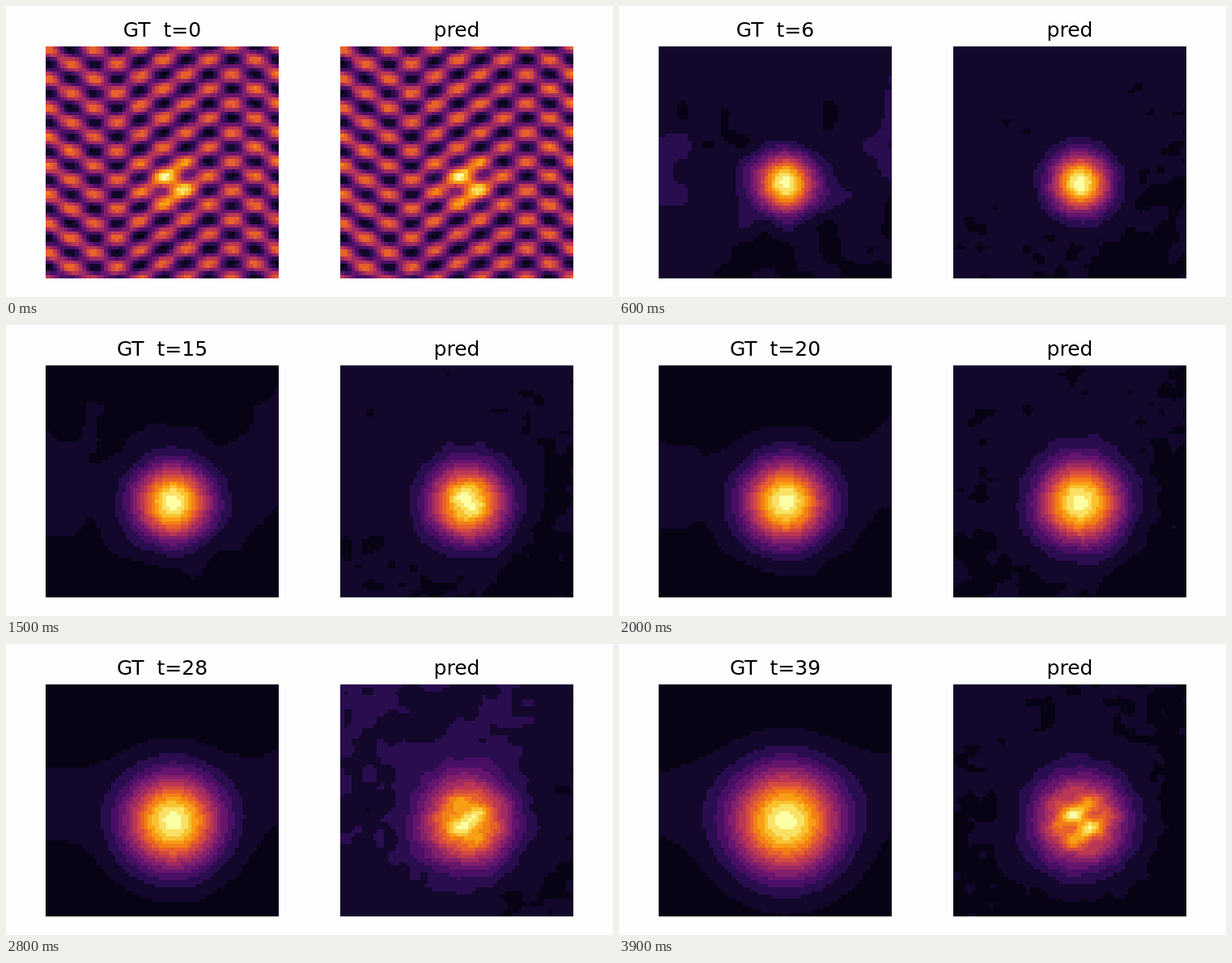
An HTML page with a canvas that plays this animation: 750x360 px, repeating every 4 s.

```html
<!DOCTYPE html>
<html lang="en">
<head>
<meta charset="utf-8">
<title>Diffusion rollout</title>
<style>
html, body { margin: 0; width: 750px; height: 360px; overflow: hidden; background: #fefefe; }
canvas, svg { position: absolute; left: 0; top: 0; }
text { font: 25px "DejaVu Sans", sans-serif; text-anchor: middle; fill: #000004; white-space: pre; }
</style>
</head>
<body>
<canvas id="stage" width="750" height="360"></canvas>
<svg width="750" height="360">
  <text id="label" x="193" y="38">GT  t=0</text>
  <text x="557" y="38">pred</text>
</svg>
<script>
const N = 64, SIZE = 288, CELL = SIZE / N, LEFT = 49, TOP = 50, PRED_OFFSET = 364;
const STEPS = 40, STEP_MS = 100, LEVELS = 14;
const CX = 206, CY = 220;
const TAU = 2 * Math.PI;

const mix = (a, b, f) => a + (b - a) * f;
const clamp = (v, lo, hi) => Math.max(lo, Math.min(hi, v));
const bell = (d, sigma) => Math.exp(-d * d / (2 * sigma * sigma));

// Dark-to-bright colour stops, evenly spaced
const stops = ['000004', '210c4a', '57106e', '8a226a', 'bc3754', 'e45a31', 'f98e09', 'f9cb35', 'fcffa4']
  .map(hex => [0, 2, 4].map(i => parseInt(hex.slice(i, i + 2), 16)));

const palette = Array.from({ length: LEVELS + 1 }, (_, k) => {
  const p = Math.max(k / LEVELS, .028) * (stops.length - 1);
  const i = Math.min(Math.floor(p), stops.length - 2);
  return stops[i].map((c, n) => Math.round(mix(c, stops[i + 1][n], p - i)));
});

// Seeded smooth noise in -1..1
function hash(x, y, z) {
  const s = Math.sin(x * 127.1 + y * 311.7 + z * 74.7) * 43758.5453;
  return (s - Math.floor(s)) * 2 - 1;
}

function noise(x, y, z) {
  const i = Math.floor(x), j = Math.floor(y), k = Math.floor(z);
  const ease = f => f * f * (3 - 2 * f);
  const u = ease(x - i), v = ease(y - j);
  const plane = d => mix(
    mix(hash(i, j, d), hash(i + 1, j, d), u),
    mix(hash(i, j + 1, d), hash(i + 1, j + 1, d), u), v);
  return mix(plane(k), plane(k + 1), z - k);
}

// Two crossing plane waves whose balance swings across the panel
function wave(x, y) {
  const shift = 5 * clamp((x - 137) / 50, 0, 1);
  const py = TAU * (y + shift) / 36;
  const px = Math.PI * (x - 137) / 28.4;
  const lean = .3 * Math.sin(TAU * (x - 137) / SIZE);
  return ((1 + lean) * Math.cos(py + px) + (1 - lean) * Math.cos(py - px)) / 2;
}

const spot = (x, y, variance) => bell(Math.hypot(x - CX, y - CY), Math.sqrt(variance));
const variance = t => 340 + 43 * t;
const waveGain = t => .75 * variance(t) / variance(0) * Math.exp(-.96 * t);

// Slowest mode: a faint band that is strongest at the side edges
function band(x, y) {
  const middle = 198 - 22 * (x - LEFT) / SIZE;
  return .05 * (1 - Math.cos(TAU * (x - CX) / SIZE)) / 2 * bell(y - middle, 46);
}

function truth(t) {
  const grain = .06 * Math.exp(-.13 * Math.max(0, t - 6));
  return (x, y) => spot(x, y, variance(t)) + waveGain(t) * wave(x, y)
    + band(x, y) + grain * noise(x / 26, y / 34, 3);
}

function prediction(t) {
  if (t === 0) return truth(0);
  const grain = .052 + .06 * bell(t - 28, 2.5);
  const ghost = .00025 * t * t * Math.sin(TAU * (t - 31) / 22);
  const spread = Math.min(variance(t), 1350);
  return (x, y) => {
    const tilt = -.0015 * (x - CX) - .002 * (y - CY);
    const texture = .4 * noise(x / 14, y / 12, t / 8) + .35 * noise(x / 40, y / 34, t / 12 + 9) + tilt;
    return spot(x, y, spread) + waveGain(t) * wave(x, y)
      + ghost * wave(x, y) * spot(x, y, 480) + grain * texture;
  };
}

const ctx = document.getElementById('stage').getContext('2d');
const label = document.getElementById('label');
const tile = document.createElement('canvas');
tile.width = tile.height = N;
const tileCtx = tile.getContext('2d');
const image = tileCtx.createImageData(N, N);
ctx.imageSmoothingEnabled = false;

function drawField(field, left) {
  const values = Array.from({ length: N * N }, (_, i) =>
    field(LEFT + (i % N + .5) * CELL, TOP + (Math.floor(i / N) + .5) * CELL));
  const lo = Math.min(...values), range = Math.max(...values) - lo;
  values.forEach((v, i) =>
    image.data.set([...palette[Math.round((v - lo) / range * LEVELS)], 255], i * 4));
  tileCtx.putImageData(image, 0, 0);
  ctx.drawImage(tile, left, TOP, SIZE, SIZE - 1);
}

let shown = -1;
function tick(now) {
  const t = Math.floor(now / STEP_MS) % STEPS;
  if (t !== shown) {
    shown = t;
    label.textContent = `GT  t=${t}`;
    drawField(truth(t), LEFT);
    drawField(prediction(t), LEFT + PRED_OFFSET);
  }
  requestAnimationFrame(tick);
}
tick(0);
</script>
</body>
</html>
```
